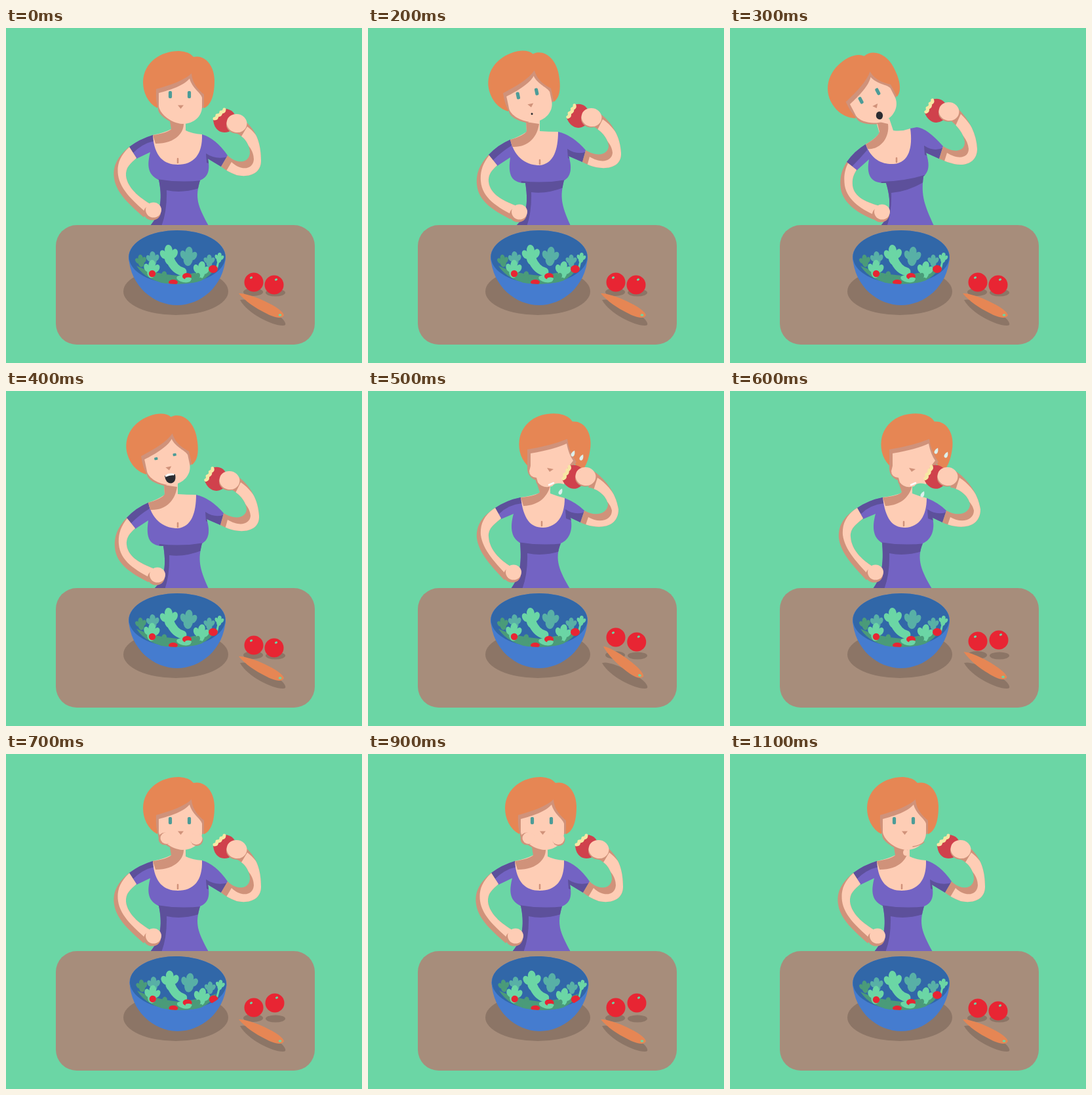
These frames come from a looping animation (543 px wide and 510 px high, 1.2 s). An HTML page with a canvas:

```html
<!DOCTYPE html>
<html lang="en">
<head>
<meta charset="utf-8">
<title>Lunch</title>
<style>
html, body { margin: 0; width: 100%; height: 100%; overflow: hidden; background: #6bd6a5; }
canvas { display: block; }
</style>
</head>
<body>
<canvas id="stage" width="543" height="510"></canvas>
<script>
const ctx = document.getElementById('stage').getContext('2d');
const C = {
  mint: '#6bd6a5', table: '#a78d7b', shadow: '#8c7566', skin: '#fecdb5', shade: '#d0927a',
  hair: '#e68654', dress: '#7363c3', dark: '#5d509b', eye: '#4c9c98', ink: '#2b2c31',
  apple: '#d0414c', cream: '#f7e7a4', red: '#e82533', bowl: '#457ccf', inside: '#3167a8',
  teal: '#58b0a6', leaf: '#4a9b79', drop: '#dcefeb'
};

// Body poses: head is [x, y, degrees] of the point between the eyes
const POSES = {
  rest: {
    head: [265, 101.5, 0], apple: [333, 141, 0], hand: [352, 145], fist: [225, 278],
    strap: [224, 163], tip: [188, 181], cuff: [338, 194, 328, 211], bust: [233, 230, 296, 232], line: [262, 199],
    dress: 'M224 163Q204 169 188 181L199 199L220 189C216 205 214 223 233 231C238 255 238 280 220 301L309 301C292 270 288 258 296 232C310 226 311 214 308 199L328 211L338 194Q320 168 299 162Z',
    chest: 'M224 163C226 196 241 208 262 208C286 208 300 193 299 162Q284 161 274 156L274 140L252 140L252 154Q240 160 224 163Z',
    neck: 'M250 142L271 144C272 158 260 176 228 176L224 163Q246 160 252 154Z',
    armL: 'M188 181C166 199 163 214 165 229C168 252 192 272 210 288L226 271C208 262 185 245 183 225C182 212 190 206 199 198Z',
    armR: 'M338 194C352 208 371 206 372 190C372 176 362 164 350 160L362 140C384 156 389 180 389 202C389 222 370 228 352 224Q338 219 328 211Z'
  },
  lean: {
    head: [243, 100, -12], apple: [320, 134, -17], hand: [341, 136], fist: [231, 281],
    strap: [217, 170], tip: [184, 193], cuff: [332, 186, 327, 204], bust: [237, 233, 300, 231], line: [262, 201],
    dress: 'M217 170Q198 178 184 193L197 210L217 197C214 218 215 236 240 236C244 262 244 284 226 301L309 301C294 268 293 256 299 232C311 226 311 210 306 195L327 204L332 186Q312 163 290 158Z',
    chest: 'M217 170C224 200 244 209 262 209C283 207 290 185 290 158Q275 158 262 157L262 140L241 140L242 158Q230 166 217 170Z',
    neck: 'M241 143L261 146C258 166 245 182 220 181L217 170Q238 164 242 157Z',
    armL: 'M184 193C168 210 165 224 166 238C168 264 192 278 217 291L230 272C208 264 186 254 184 234C183 224 188 217 197 209Z',
    armR: 'M332 186C350 197 366 193 367 180C366 165 352 154 342 149L352 129C374 144 385 168 386 190C387 210 368 216 348 212Q336 209 327 204Z'
  },
  tilt: {
    head: [212.5, 103.5, -27.5], apple: [314, 126, -18], hand: [334, 127], fist: [232, 281],
    strap: [207, 177], tip: [178, 204], cuff: [325, 180, 319, 199], bust: [234, 234, 297, 223], line: [254, 198],
    dress: 'M207 177Q190 187 178 204L193 217L212 200C208 222 213 237 238 236C246 262 246 284 230 301L311 301C297 270 291 256 295 226C305 218 304 205 299 190L319 199L325 180Q300 152 285 151L275 153Z',
    chest: 'M207 177C216 202 234 208 250 207C273 205 279 182 275 153Q262 158 249 156L243 138L222 140L228 160Q220 170 207 177Z',
    neck: 'M224 142L241 146C244 168 228 186 210 184L207 177Q226 166 228 158Z',
    armL: 'M178 204C169 218 167 230 169 245C173 268 197 283 220 292L232 272C208 266 189 257 187 240C186 230 188 224 193 216Z',
    armR: 'M325 180C342 191 358 188 358 174C357 160 346 149 337 141L346 121C366 140 376 162 377 184C377 204 360 211 342 207Q330 204 319 199Z'
  },
  bite: {
    head: [284, 101, 7], apple: [313, 131, -20], hand: [332, 130], fist: [222, 277],
    strap: [233, 162], tip: [194, 178], cuff: [330, 182, 324, 200], bust: [231, 230, 295, 232], line: [265, 199],
    dress: 'M233 162Q212 166 194 178L203 195L222 187C217 205 217 223 232 231C234 255 234 280 218 301L308 301C292 274 284 256 294 232C308 226 313 210 309 193L324 200L330 182Q318 170 300 163Z',
    chest: 'M233 162C237 194 247 208 267 208C289 207 300 190 300 163Q288 160 278 156L278 140L261 140L262 155Q250 160 233 162Z',
    neck: 'M258 142L278 144C274 160 262 174 237 175L233 162Q256 160 262 154Z',
    armL: 'M194 178C170 193 165 208 166 224C169 248 190 268 208 288L223 270C204 260 185 243 184 222C183 208 194 202 203 194Z',
    armR: 'M330 182C347 192 366 187 366 172C364 160 350 148 336 147L344 122C360 132 378 154 382 180C382 202 364 209 344 206Q332 204 324 200Z'
  }
};

// One entry per 100 ms step; the first is held twice as long.
// hop: lift of left tomato, right tomato, carrot
const STEPS = [
  { pose: 'rest' },
  { pose: 'lean', mouth: 1 },
  { pose: 'tilt', mouth: 2 },
  { pose: 'lean', mouth: 3 },
  { pose: 'bite', hop: [12, 9, 9], drops: 0 },
  { pose: 'bite', hop: [6, 12, 4], drops: 4 },
  { pose: 'rest', cheeks: 1, hop: [1, 12, 0], sway: 1 },
  { pose: 'rest', cheeks: 0.6 },
  { pose: 'rest', cheeks: 1, hop: [1, 12, 0], sway: 1 },
  { pose: 'rest', cheeks: 0.6 },
  { pose: 'rest', swallow: true }
];

function shape(color, d) {
  const p = new Path2D(d);
  ctx.fillStyle = color;
  ctx.fill(p);
  return p;
}

function oval(color, x, y, rx, ry = rx, turn = 0) {
  ctx.fillStyle = color;
  ctx.beginPath();
  ctx.ellipse(x, y, rx, ry, turn, 0, Math.PI * 2);
  ctx.fill();
}

function line(color, width, d) {
  ctx.strokeStyle = color;
  ctx.lineWidth = width;
  ctx.lineCap = ctx.lineJoin = 'round';
  ctx.stroke(new Path2D(d));
}

function group(x, y, deg, draw) {
  ctx.save();
  ctx.translate(x, y);
  ctx.rotate(deg * Math.PI / 180);
  draw();
  ctx.restore();
}

// Limb in shade, with a lit copy moved inside its outline
function limb(d, dx, dy) {
  const p = shape(C.shade, d);
  ctx.save();
  ctx.clip(p);
  ctx.translate(dx, dy);
  ctx.fillStyle = C.skin;
  ctx.fill(p);
  ctx.restore();
}

function drawBody(p) {
  const [sx, sy] = p.strap, [tx, ty] = p.tip, [ax, ay, bx, by] = p.cuff;
  const [ux, uy, vx, vy] = p.bust, mx = (ux + vx) / 2, my = (uy + vy) / 2;
  const dress = shape(C.dress, p.dress);
  ctx.save();
  ctx.clip(dress);
  shape(C.dark, `M${ux - 3} ${uy}Q${mx} ${my + 5} ${vx + 3} ${vy}
    L${vx - 2} ${vy + 12}Q${mx + 4} ${my + 21} ${ux + 12} ${uy + 17}Q${ux + 13} ${uy + 48} ${ux + 4} ${uy + 72}L${ux - 22} ${uy + 72}Z`);
  shape(C.dark, `M${tx - 3} ${ty}L${sx} ${sy - 6}L${sx + 2} ${sy + 9}Q${tx + 20} ${ty - 5} ${tx + 6} ${ty + 9}Z`);
  shape(C.dark, `M${bx - 23} ${by - 20}Q${bx - 8} ${by - 10} ${ax + 1} ${ay + 2}L${bx + 1} ${by + 3}L${bx - 22} ${by - 6}Z`);
  ctx.restore();
  shape(C.skin, p.chest);
  shape(C.shade, p.neck);
  line(C.shade, 2.5, `M${p.line[0]} ${p.line[1]}v6`);
  limb(p.armL, 6, -5);
  limb(p.armR, 6, 10);
  const [fx, fy] = p.fist;
  oval(C.shade, fx - 2, fy + 3, 13, 11.5);
  oval(C.skin, fx, fy - 1, 12, 11.5);
}

function drawMouth(kind) {
  if (kind === 1) oval(C.ink, 265.5, 133, 1.5);
  if (kind === 2) oval(C.ink, 265, 135, 5.2, 6, 0.4);
  if (kind === 3) {
    shape(C.ink, 'M258 130Q266 126 274 131Q274 143 265 143Q257 141 258 130Z');
    shape('#fff', 'M259 129Q266 126 273 130L272 132Q266 130 259 132Z');
  }
}

function drawHead(p, step) {
  const [x, y, deg] = p.head;
  const biting = p === POSES.bite;
  group(x, y, deg, () => {
    ctx.translate(-265, -101.5);
    shape(C.hair, 'M231 122C216 114 209 98 209 82C210 52 236 35 264 35Q280 36 286 44C304 40 318 58 318 80C318 104 312 118 302 122L296 100L235 100Z');
    if (biting) return;
    shape(C.shade, 'M229 93C250 87 272 80 283 69C284 86 296 96 302 101L302 121L297 123L256 145C242 139 231 130 232 122Q228 112 229 93Z');
    shape(C.skin, 'M233 99C252 94 272 87 280 77C284 92 297 98 299 106L299 120C299 134 287 146 269 146C253 145 235 132 233 119Z');
    if (step.cheeks) {
      const k = step.cheeks;
      oval(C.shade, 242, 129, 9.5 * k, 9.5 * k);
      oval(C.skin, 245, 128, 9.5 * k, 9 * k);
      oval(C.shade, 291, 131, 9.5 * k, 9 * k);
      oval(C.skin, 290, 129, 9.5 * k, 9 * k);
    }
    if (step.swallow) {
      line(C.shade, 1.5, 'M279 141Q289 140 296 134');
      oval(C.skin, 268, 150, 4, 5);
    }
    const tall = step.mouth === 3 ? 4 : 11;
    ctx.fillStyle = C.eye;
    for (const ex of [250.5, 279.5]) {
      ctx.beginPath();
      ctx.roundRect(ex - 2.6, 101.5 - tall / 2, 5.2, tall, tall > 5 ? 2 : 1);
      ctx.fill();
    }
    shape(C.shade, 'M262 117.5L271 117.5L266.5 123Z');
    drawMouth(step.mouth);
  });
  if (biting) {
    shape(C.shade, 'M243 89Q280 83 304 73Q306 92 318 108L310 119L300 122L262 145Q256 142 256 136Q243 130 243 118Z');
    shape(C.skin, 'M248 95Q284 89 303 80Q306 96 313 106L303 119L299 142Q286 138 281 145Q266 149 259 139L257 132Q246 131 246 122L248 114Z');
    shape(C.shade, 'M273 117L283 119L277 123Z');
    line('#fff', 2.5, 'M276 143L283 140');
  }
}

function drawApple(p) {
  const [x, y, deg] = p.apple, [hx, hy] = p.hand;
  const bite = 'Q-11 -3 -11 -8Q-5 -8 -5 -13Q0 -13 0 -17';
  group(x, y, deg, () => {
    shape(C.apple, `M0 -18C12 -18 18 -10 18 0C18 12 9 18 0 18C-10 18 -17 9 -17 -3${bite}Z`);
    line(C.cream, 5, `M-15 -3${bite}`);
  });
  oval(C.shade, hx - 1, hy + 2, 15, 13.5);
  oval(C.skin, hx, hy, 15.5, 14, 0.2);
}

function drop(x, y) {
  group(x, y, 25, () => shape(C.drop, 'M0 -5Q4 1 2 4Q0 6 -2 4Q-4 1 0 -5Z'));
}

// Three soft lobes on a tapering body
function leaf(color, x, y, size, deg) {
  group(x, y, deg, () => {
    ctx.scale(size, size);
    oval(color, 0, -0.55, 0.33, 0.45);
    oval(color, -0.46, -0.22, 0.27, 0.4, -0.45);
    oval(color, 0.46, -0.22, 0.27, 0.4, 0.45);
    oval(color, 0, 0.1, 0.42, 0.62);
  });
}

function drawBowl(sway) {
  group(261 + sway, 365, 1.6 * sway, () => {
    ctx.translate(-261, -365);
    shape(C.bowl, 'M187 349C190 394 226 422 261 422C296 422 332 394 335 349Z');
    oval(C.bowl, 261, 349, 74, 41);
    oval(C.inside, 261, 348.5, 73.5, 40.5);
    ctx.save();
    ctx.beginPath();
    ctx.ellipse(261, 349, 74, 41, 0, 0, Math.PI * 2);
    ctx.clip();
    shape(C.leaf, 'M199 362Q224 374 262 377Q300 372 320 363Q308 390 262 391Q216 389 199 362Z');
    leaf(C.teal, 224, 353, 13, -4);
    leaf(C.teal, 278, 350, 17, 6);
    leaf(C.teal, 310, 356, 11, 0);
    leaf(C.leaf, 206, 356, 11, -8);
    leaf(C.mint, 222, 369, 16, 4);
    leaf(C.leaf, 240, 382, 12, 10);
    leaf(C.mint, 297, 371, 16, 10);
    leaf(C.leaf, 289, 384, 12, 25);
    leaf(C.mint, 325, 351, 9, 8);
    line(C.mint, 3, 'M324 355L321 368');
    leaf(C.mint, 249, 348, 18, -6);
    line(C.mint, 13, 'M250 352Q257 368 269 371');
    oval(C.mint, 271, 382, 11, 5, 0.2);
    oval(C.red, 223, 374, 5.2);
    oval(C.red, 316, 367 + 5 * sway, 7, 6);
    oval(C.red, 276, 378, 7, 5);
    oval(C.mint, 278, 382, 5, 2.5);
    oval(C.red, 255, 387, 7, 4);
    ctx.restore();
  });
}

function tomato(x, y, gx, gy) {
  oval(C.red, x, y, 14.5);
  oval(C.mint, x + gx, y + gy, 2.2, 1.5, -0.4);
}

function drawTable([left, right, carrot], sway) {
  ctx.fillStyle = C.table;
  ctx.beginPath();
  ctx.roundRect(76, 300, 395, 182, 32);
  ctx.fill();
  oval(C.shadow, 259, 401, 80, 36);
  drawBowl(sway);
  oval(C.shadow, 377, 402, 15, 6);
  oval(C.shadow, 411, 403, 15, 5.5);
  shape(C.shadow, 'M357 414C372 409 430 440 426 452C418 458 370 438 357 414Z');
  tomato(378, 387 - left, -4, -7);
  tomato(409 + right / 12, 391 - right, 3, -8);
  group(390, 421 - carrot, carrot * 1.2, () => {
    shape(C.hair, 'M-35 -17C-18 -18 32 5 34 16C31 24 15 18 5 12.5C-10 5 -25 -5 -35 -17Z');
    oval(C.mint, 28, 16, 2.4, 1.8);
  });
}

function draw(step) {
  const p = POSES[step.pose];
  ctx.fillStyle = C.mint;
  ctx.fillRect(0, 0, 543, 510);
  drawBody(p);
  drawHead(p, step);
  drawApple(p);
  if (step.drops !== undefined) {
    const d = step.drops;
    drop(313 + d / 2, 95 - d);
    drop(326 + d, 101 - d);
    drop(294, 153 + d);
  }
  drawTable(step.hop || [0, 0, 0], step.sway || 0);
}

const start = performance.now();
function tick() {
  const t = (performance.now() - start) % 1200;
  draw(STEPS[Math.max(0, Math.floor(t / 100) - 1)]);
  requestAnimationFrame(tick);
}
tick();
</script>
</body>
</html>
```
